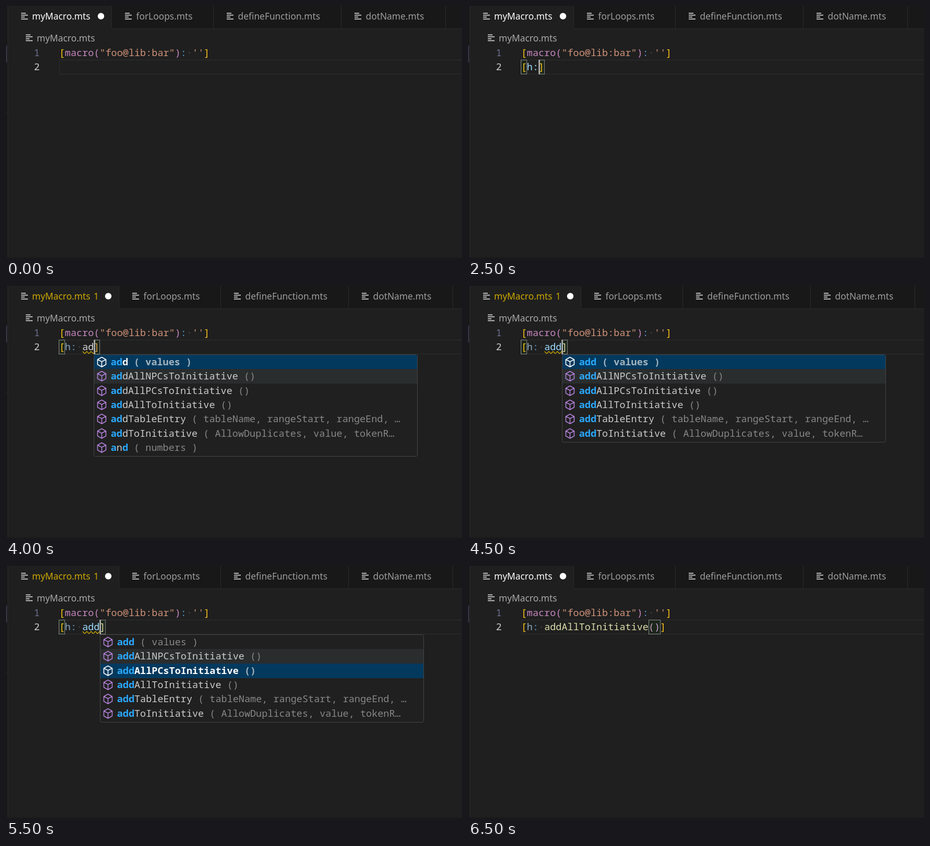
Recreate the animation shown at these times as an HTML page. Size 874 by 483 pixels, loop 7 s.

```html
<!DOCTYPE html>
<html lang="en">
<head>
<meta charset="utf-8">
<title>Macro editor</title>
<style>
  html, body { margin: 0; width: 100%; height: 100%; overflow: hidden; background: #1f1f1f; }
  svg { display: block; }
  text { white-space: pre; font: 17.35px "Noto Sans", sans-serif; }
  .code { font: 500 18.5px "Noto Sans Mono", monospace; }
  .active { font-weight: 600; }
  .match { font-weight: 700; fill: #2aaaff; }
</style>
</head>
<body>
<svg id="stage" width="874" height="483" viewBox="0 0 874 483"></svg>
<script>
const stage = document.getElementById('stage');
const STEP = 500, CHAR = 11.1, ROW = 27.33;
const GOLD = '#fcc419', PLAIN = '#d4d4d4', CYAN = '#9cdcfe', BLUE = '#569cd6',
      DIM = '#86a9bf', PINK = '#c586c0', STRING = '#ce9178', PALE = '#dcdcaa',
      DOT = '#484848', WARN = '#cca700', LINE = '#2b2b2b';

const column = n => 102.3 + n * CHAR;
const rect = (x, y, w, h, fill, extra = '') =>
  `<rect x="${x}" y="${y}" width="${w}" height="${h}" fill="${fill}" ${extra}/>`;
const label = (x, y, s, fill, cls = '') =>
  `<text x="${x}" y="${y}" fill="${fill}" class="${cls}">${s}</text>`;
const span = (s, fill) => `<tspan fill="${fill}">${s}</tspan>`;
const code = (y, tokens) =>
  label(101.7, y, tokens.map(t => span(...t)).join(''), PLAIN, 'code');

const fileIcon = (x, y) => [9, 13, 7, 13]
  .map((w, i) => rect(x, y + i * 3.7, w, 1.7, '#d0d2d0')).join('');

// Completion entries: name and parameter list
const functions = [
  ['abort', '( value )'], ['abs', '( num )'], ['absolutevalue', '( num )'],
  ['add', '( values )'], ['addAllNPCsToInitiative', '()'],
  ['addAllPCsToInitiative', '()'], ['addAllToInitiative', '()'],
  ['addTableEntry', '( tableName, rangeStart, rangeEnd, …'],
  ['addToInitiative', '( AllowDuplicates, value, tokenR…'],
  ['and', '( numbers )'], ['arg', '( num )'], ['argCount', '()']
];
const macro = [['h', '']];

const bracketed = (...inner) => [['[', GOLD], ...inner, [']', GOLD]];
const call = (name, color, close = GOLD) =>
  [['[', GOLD], ['h', DIM], [':', BLUE], ['·', DOT], [name, color], [']', close]];
const typedH = color => ({
  line: bracketed(['h', color]), boxes: [0, 2], cursor: 2, wave: [1, 2],
  list: macro, query: 'h', selected: 0
});
const typedAdd = (selected, cursor) => ({
  line: call('add', CYAN, PALE), boxes: [0, 7], cursor, wave: [4, 7],
  list: functions.slice(3, 9), query: 'add', selected, hover: 1
});

const states = [
  {},
  { cursor: 0 },
  { line: bracketed(), boxes: [0, 1], cursor: 1 },
  typedH(PLAIN),
  typedH(CYAN),
  { line: bracketed(['h:', CYAN]), boxes: [0, 3], cursor: 3 },
  { line: bracketed(['h', DIM], [':', BLUE], ['·', DOT]), boxes: [0, 4], cursor: 4 },
  { line: call('a', PLAIN), boxes: [0, 5], cursor: 5, wave: [4, 5],
    list: functions, query: 'a', selected: 0, hover: 1 },
  { line: call('ad', PLAIN, '#e0a040'), boxes: [0, 6], cursor: 6, wave: [4, 6],
    list: functions.slice(3, 10), query: 'ad', selected: 0, hover: 1 },
  typedAdd(0, 7),
  typedAdd(1),
  typedAdd(2, 7),
  typedAdd(3, 7),
  { line: [['[', GOLD], ['h', DIM], [':', BLUE], ['·', DOT],
           ['addAllToInitiative', PALE], ['()', '#c9a0c6'], [']', GOLD]], call: 22 }
];

function tabs(warned) {
  const shift = warned ? 14 : 0;
  let out = rect(0, 0, 874, 44, '#181818') + rect(203 + shift, 43, 671, 1, LINE)
    + rect(4, 0, 198 + shift, 44, '#1f1f1f')
    + fileIcon(29, 13) + label(50, 26, 'myMacro.mts', warned ? WARN : '#fff')
    + (warned ? label(168, 26, '1', WARN) : '')
    + `<circle cx="${182 + shift}" cy="19.5" r="6.2" fill="#fff"/>`;
  for (const [x, name] of [[228, 'forLoops.mts'], [423, 'defineFunction.mts'], [668, 'dotName.mts']])
    out += fileIcon(x + shift, 13) + label(x + 21.5 + shift, 26, name, '#9d9d9d');
  for (const x of [202, 397, 642, 842]) out += rect(x + shift, 0, 1, 44, LINE);
  return out;
}

function frame() {
  return rect(0, 44, 3, 439, '#181818') + rect(3, 0, 1, 483, LINE)
    + rect(0, 76, 2, 32, '#37374a') + rect(0, 203, 3, 1, LINE) + rect(0, 482, 874, 1, '#181818')
    + fileIcon(38, 54.5) + label(59, 68, 'myMacro.mts', '#a9a9a9')
    + label(53.5, 96, '1', '#6e7090', 'code') + label(53.5, 123, '2', '#cccccc', 'code')
    + rect(102.5, 103.5, 780, 27, 'none', 'stroke="#2a2a2a" stroke-width="1.4"')
    + code(96, [['[', GOLD], ['macro(', PINK], ['"foo@lib:bar"', STRING], [')', PINK],
                [':', BLUE], ['·', DOT], ["''", STRING], [']', GOLD]]);
}

const outline = (col, chars) => rect(Math.round(column(col)) - .5, 103.5, chars * CHAR, 27,
  'rgba(0,100,0,.1)', 'stroke="#888"');

function squiggle(from, to) {
  const start = column(from), end = column(to);
  let d = '';
  for (let x = start; x <= end; x++)
    d += `${d ? 'L' : 'M'}${x} ${127.5 - 1.8 * Math.cos((x - start) * Math.PI / 4.1)}`;
  return `<path d="${d}" fill="none" stroke="${WARN}" stroke-width="1.4"/>`;
}

const cube = (x, y, color) =>
  `<path transform="translate(${x} ${y})" fill="none" stroke="${color}" stroke-width="1.6"
    stroke-linejoin="round" d="M-8-4.5 0-9 8-4.5V5L0 9.5-8 5ZM-8-4.5 0-.5 8-4.5M0-.5V9.5"/>`;
const keyword = (x, y) =>
  `<path transform="translate(${x} ${y}) scale(1.4)" fill="none" stroke="#fff"
    d="M1.5 2.5h6v2h-6zM10 3.5h5M1 7.5h9M12 7.5h2M1 10.5h6M10 10.5h5M1 13.5h11"/>`;

// Marks the typed letters, taken in order, inside a name
function highlight(name, query) {
  let next = 0;
  return [...name].map(c => c === query[next] ? (next++, `<tspan class="match">${c}</tspan>`) : c).join('');
}

function popup({ list, query, selected, hover, wave }) {
  const x = Math.floor(column(wave[1]));
  let out = rect(x + .5, 131.5, 620, Math.round(list.length * ROW) + 4, '#202020',
    'rx="3" stroke="#454545"');
  list.forEach(([name, params], i) => {
    const top = Math.round(132 + i * ROW), active = i === selected;
    if (active || i === hover)
      out += rect(x + 1, top, 619, Math.ceil(ROW), active ? '#04395e' : '#2a2d2e');
    out += list === macro ? keyword(x + 4, top + 2.4)
                          : cube(x + 15.5, top + 13.5, active ? '#fff' : '#b180d7');
    out += label(x + 32.7, top + 20,
      highlight(name, query) + span(' ' + params, active ? '#a3b4c1' : '#878787'),
      active ? '#fff' : '#cccccc', active ? 'code active' : 'code');
  });
  return out;
}

function draw(s) {
  let out = tabs(s.list) + frame();
  for (const col of s.boxes || []) out += outline(col, 1);
  if (s.call) out += outline(s.call, 2);
  if (s.line) out += code(123, s.line);
  if (s.wave) out += squiggle(...s.wave);
  if (s.cursor !== undefined) out += rect(Math.round(column(s.cursor)), 103, 2, 28, '#aeafad');
  if (s.list) out += popup(s);
  stage.innerHTML = out;
}

let shown = -1;
function tick() {
  const index = Math.floor(performance.now() / STEP) % states.length;
  if (index !== shown) draw(states[shown = index]);
  requestAnimationFrame(tick);
}
tick();
</script>
</body>
</html>
```
